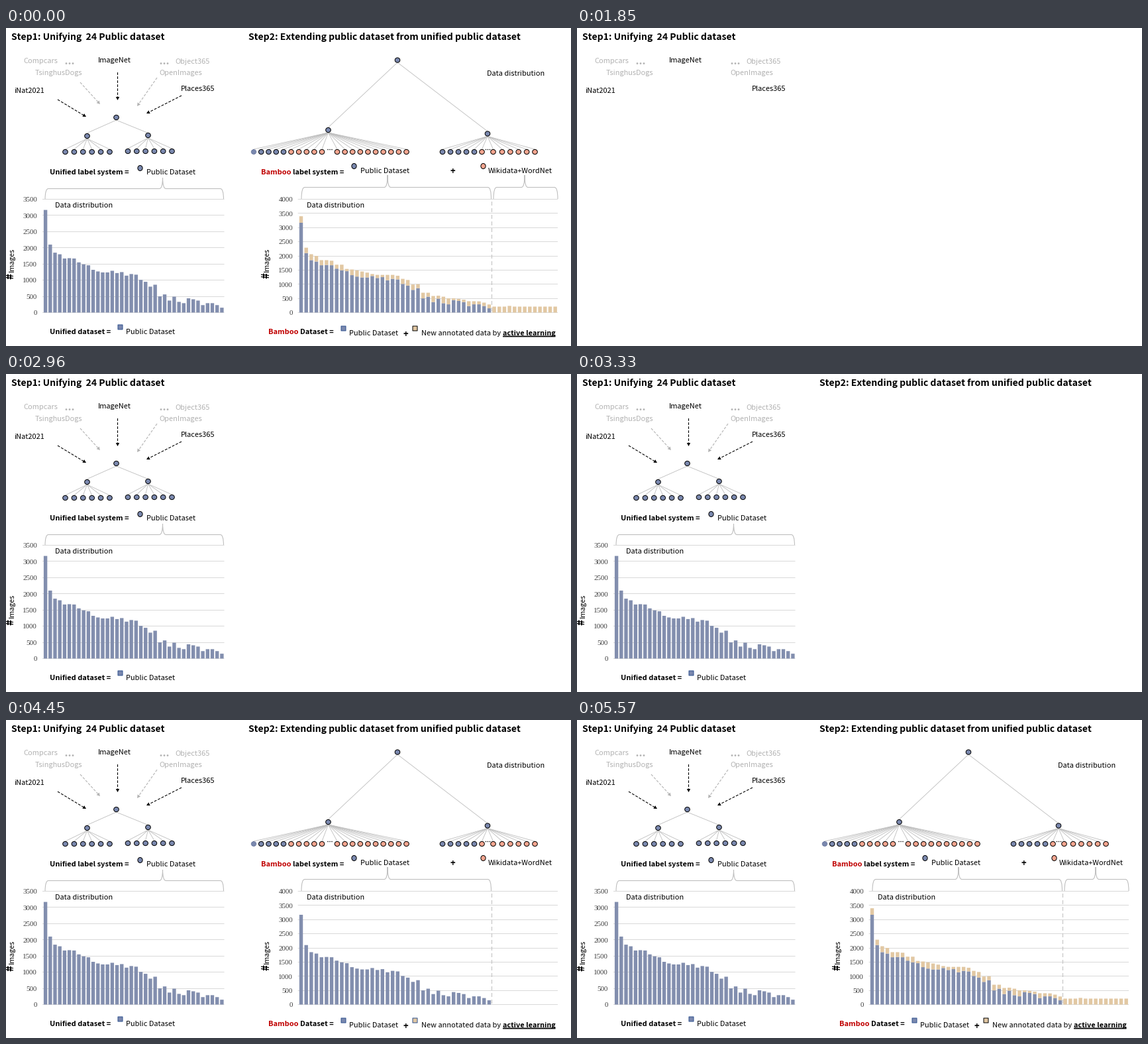
Animation, 853 px wide and 480 px high, one loop 6700 ms. Source, as a matplotlib script:

```python
import numpy as np
import matplotlib.pyplot as plt
from matplotlib.animation import FuncAnimation
from matplotlib.collections import EllipseCollection, LineCollection, PolyCollection
from matplotlib.patches import PathPatch
from matplotlib.path import Path

W, H, DPI = 853, 480, 64
LOOP, TICK = 6700, 20

# Moments at which the slide builds, in ms; the last build also opens the loop.
TIMES = [1110, 1480, 1850, 2220, 2590, 2960, 3330, 3700, 4450, 4820, 5570]
(TITLE1, ROW, NAMES, ARROWS, TREE1, CHART1,
 TITLE2, TREE2, CHART2, EXTRA, ACTIVE) = range(len(TIMES))
LAST = ACTIVE

BLUE, TAN, PINK, NODE = "#828eae", "#e2c8a3", "#f4a58f", "#7a88ae"
GRAY, GRID, RED = "#b3b3b3", "#d9d9d9", "#c00000"
LINE = "#bfbfbf"

PUBLIC = np.array([
    3170, 2100, 1850, 1800, 1670, 1680, 1670, 1550, 1490, 1460, 1320, 1270, 1240,
    1240, 1290, 1220, 1250, 1140, 1190, 1170, 1010, 950, 800, 860, 500, 560, 370,
    490, 330, 290, 440, 410, 370, 230, 290, 290, 230, 150])
TOTAL = np.array([
    3400, 2290, 2060, 2000, 1850, 1850, 1830, 1690, 1690, 1540, 1520, 1490, 1450,
    1410, 1360, 1330, 1330, 1330, 1330, 1300, 1190, 1150, 990, 1000, 700, 700, 585,
    595, 560, 500, 500, 480, 455, 400, 400, 395, 350, 285])
NEW = np.full(13, 210)
NEW[3] = 235

fig = plt.figure(figsize=(W / DPI, H / DPI), dpi=DPI, facecolor="white")
ax = fig.add_axes([0, 0, 1, 1])
ax.set_xlim(0, W)
ax.set_ylim(H, 0)
ax.axis("off")

parts = []


def px(size):
    return size * 72 / DPI


def keep(artist, first, last=LAST):
    """Register an artist that is visible from step first to step last."""
    artist.set_zorder(10 + len(parts))
    artist.set_snap(False)
    parts.append((artist, first, last))


def text(x, y, s, first, last=LAST, size=11, bold=False, color="black",
         family="Noto Sans CJK JP", **kw):
    keep(ax.text(x, y, s, fontsize=px(size), family=family, color=color,
                 weight="bold" if bold else "normal", va="baseline", **kw), first, last)


def lines(segments, first, color=LINE, width=1.0, style="solid"):
    group = LineCollection(segments, colors=color, linewidths=px(width), linestyles=style)
    keep(ax.add_collection(group), first)


def polys(shapes, first, last=LAST, color=BLUE, edge="none"):
    group = PolyCollection(shapes, facecolors=color, edgecolors=edge, linewidths=px(1))
    keep(ax.add_collection(group), first, last)


def dots(points, first, last=LAST, color=NODE, size=(7.6, 7.2), edge="black", style="solid"):
    n = len(points)
    group = EllipseCollection(
        [size[0]] * n, [size[1]] * n, [0] * n, units="xy", offsets=points,
        offset_transform=ax.transData, facecolors=color, edgecolors=edge,
        linewidths=px(1), linestyles=style)
    keep(ax.add_collection(group), first, last)


def ellipsis(x, y, step, first, last=LAST, color=GRAY, size=2.8):
    dots([(x + i * step, y) for i in range(3)], first, last, color, (size, size), "none")


def rect(x0, y0, x1, y1):
    return [(x0, y0), (x1, y0), (x1, y1), (x0, y1)]


def square(x, y, first, last=LAST, color=NODE, edge="#2f528f"):
    polys([rect(x, y, x + 7, y + 7)], first, last, color, edge)


def arrow(start, end, color):
    start, end = np.array(start, float), np.array(end, float)
    d = (end - start) / np.hypot(*(end - start))
    side = np.array([-d[1], d[0]]) * 2.7
    base = end - 5 * d
    lines([(start, base)], ARROWS, color, 1.1, (0, (3.5, 2)))
    polys([[end, base + side, base - side]], ARROWS, color=color)


def brace(x0, x1, tip, foot, bar, peak, first):
    r, c = 5, Path.CURVE3
    pts = [(x0, foot), (x0, bar), (x0 + r, bar), (tip - r, bar), (tip, bar), (tip, peak),
           (tip, bar), (tip + r, bar), (x1 - r, bar), (x1, bar), (x1, foot)]
    codes = [Path.MOVETO, c, c, Path.LINETO, c, c, c, c, Path.LINETO, c, c]
    patch = PathPatch(Path(pts, codes), fill=False, edgecolor=LINE, linewidth=px(1.1))
    keep(ax.add_patch(patch), first)


def fan(root, xs, y, first):
    lines([[(root[0], root[1] + 4), (x, y - 4)] for x in xs], first, width=0.85)


def row(xs, y):
    return [(x, y) for x in xs]


class Chart:
    base, top = 429.5, 258.5

    def __init__(self, left, right, slots, peak, label_x, first):
        self.left, self.pitch, self.peak = left, (right - left) / slots, peak
        ticks = range(0, peak + 1, 500)
        levels = [np.floor(self.y(v)) + 0.5 for v in ticks]
        lines([[(left - 1, y), (right, y)] for y in levels], first, GRID)
        for v in ticks:
            text(label_x, self.y(v) + 3.8, str(v), first, family="Liberation Serif",
                 color="#404040", ha="right")

    def y(self, value):
        return self.base - value / self.peak * (self.base - self.top)

    def bars(self, low, high, first, color, start=0):
        shapes = []
        for i, (a, b) in enumerate(zip(low, high), start):
            x = self.left + (i + 0.5) * self.pitch
            shapes.append(rect(x - 2.7, self.y(b), x + 2.7, self.y(a)))
        polys(shapes, first, color=color)


def axis_name(x, y, first):
    kw = dict(rotation=90, rotation_mode="anchor", ha="left")
    text(x, y, "#", first, size=15, bold=True, **kw)
    text(x, y - 10.5, "Images", first, size=10.8, **kw)


# Step 1: data set names, first in one row, then around the tree
text(8, 18, "Step1: Unifying  24 Public dataset", TITLE1, size=14, bold=True)
names = [("iNat2021", 12, 98, "black", 48), ("ImageNet", 139, 52, "black", 115),
         ("Places365", 264, 95, "black", 186), ("Compcars", 26, 53, GRAY, 258),
         ("TsinghusDogs", 44, 71, GRAY, 329), ("Object365", 255, 54, GRAY, 421),
         ("OpenImages", 231, 71, GRAY, 494)]
for name, x, y, color, row_x in names:
    text(row_x, 69, name, ROW, ROW, color=color)
    text(x, y, name, NAMES, color=color)
ellipsis(569, 68, 5, ROW, ROW)
ellipsis(91, 53.5, 5, NAMES)
ellipsis(234, 53.5, 5, NAMES)

arrow((78, 108), (121, 134), "black")
arrow((168.5, 67), (168.5, 109), "black")
arrow((265, 102), (212, 129), "black")
arrow((112, 82), (142, 115), GRAY)
arrow((228, 75), (198, 118), GRAY)

# Unified label tree
root, kid_a, kid_b = (166.5, 135), (122.5, 163), (214.5, 162)
leaves_a, leaves_b = np.linspace(89.5, 156.5, 6), np.linspace(184, 250.5, 6)
fan(root, [kid_a[0], kid_b[0]], 162.5, TREE1)
fan(kid_a, leaves_a, 187, TREE1)
fan(kid_b, leaves_b, 186, TREE1)
dots([root, kid_a, kid_b] + row(leaves_a, 187) + row(leaves_b, 186), TREE1)
text(66, 221, "Unified label system =", TREE1, bold=True)
dots([(202, 210.5)], TREE1, size=(7.2, 8))
text(212.5, 221, "Public Dataset", TREE1)

# Unified data chart
brace(59, 328.5, 236.5, 259, 242.5, 226, CHART1)
chart = Chart(56, 329.5, 38, 3500, 47, CHART1)
chart.bars(0 * PUBLIC, PUBLIC, CHART1, BLUE)
text(74.5, 271, "Data distribution", CHART1)
axis_name(11.5, 379, CHART1)
text(66, 462, "Unified dataset =", CHART1, bold=True)
square(168.5, 447.5, CHART1)
text(181.5, 462, "Public Dataset", CHART1)

# Step 2: extended tree
text(366, 18, "Step2: Extending public dataset from unified public dataset", TITLE2,
     size=14, bold=True)
root, kid_a, kid_b = (591, 48.5), (486.5, 154), (727, 159.5)
blue_a, pink_a = np.linspace(374, 419, 5), np.linspace(430.5, 477, 5)
more_a = np.linspace(500, 604.5, 10)
blue_b = np.linspace(659, 707, 5)
pink_b = np.append([718.5, 735.5], np.linspace(749, 798.5, 5))
lines([[(591, 52), (486.5, 150)], [(591, 52), (727, 156)]], TREE2, width=0.85)
fan(kid_a, np.concatenate([blue_a, pink_a, more_a]), 187, TREE2)
fan(kid_b, np.concatenate([blue_b, pink_b]), 187, TREE2)
dots([root, kid_a, kid_b] + row(blue_a[1:], 187) + row(blue_b, 187), TREE2)
dots([(blue_a[0], 187)], TREE2, edge="#4c5a86", style=(0, (1, 1)))
dots(row(np.concatenate([pink_a, more_a, pink_b]), 187), TREE2, color=PINK)
ellipsis(486, 183.5, 3, TREE2, color="black", size=1.5)
ellipsis(724.5, 183.5, 3, TREE2, color="black", size=1.5)

text(385, 221, "Bamboo", TREE2, bold=True, color=RED)
text(433.5, 221, "label system =", TREE2, bold=True)
dots([(525, 208)], TREE2, size=(7.2, 8))
text(535.5, 219, "Public Dataset", TREE2)
for plus_x, dot_x, label_x, first, last in [(616.5, 636.5, 644, TREE2, TREE2),
                                            (671, 720, 727.5, CHART2, LAST)]:
    text(plus_x, 221, "+", first, last, size=13, bold=True)
    dots([(dot_x, 208)], first, last, PINK, (7.2, 8))
    text(label_x, 219, "Wikidata+WordNet", first, last)

# Extended data chart
text(726.5, 72, "Data distribution", CHART2)
brace(446, 732.5, 576, 258, 240.5, 222, CHART2)
chart = Chart(441.7, 833, 51, 4000, 433, CHART2)
lines([[(733.5, 262), (733.5, 429)]], CHART2, LINE, 1, (0, (6, 4)))
chart.bars(0 * PUBLIC, PUBLIC, CHART2, BLUE)
text(454, 271, "Data distribution", CHART2)
axis_name(397, 378, CHART2)
text(396, 462, "Bamboo", CHART2, bold=True, color=RED)
text(444, 462, "Dataset =", CHART2, bold=True)
square(505.5, 449.5, CHART2)
text(518.5, 464, "Public Dataset", CHART2)
text(600, 467, "+", CHART2, size=13, bold=True)
square(613.5, 449.5, CHART2, EXTRA, TAN)
text(627, 464, "New annotated data by", CHART2)
text(750, 464, "active learning", CHART2, size=10.8, bold=True)
lines([[(750, 465.5), (829.5, 465.5)]], CHART2, "black", 1.8)

# Newly annotated data
chart.bars(PUBLIC, TOTAL, EXTRA, TAN)
chart.bars(0 * NEW, NEW, ACTIVE, TAN, start=len(PUBLIC))
brace(736, 833, 783, 258, 240.5, 222, ACTIVE)
square(613.5, 449.5, ACTIVE, color=TAN, edge="black")


def update(frame):
    t = frame * TICK + TICK / 2
    step = (np.searchsorted(TIMES, t, side="right") - 1) % len(TIMES)
    for artist, first, last in parts:
        artist.set_visible(first <= step <= last)
    return []


anim = FuncAnimation(fig, update, frames=LOOP // TICK, interval=TICK,
                     init_func=lambda: update(0), repeat=True, repeat_delay=0)
plt.show()
```
